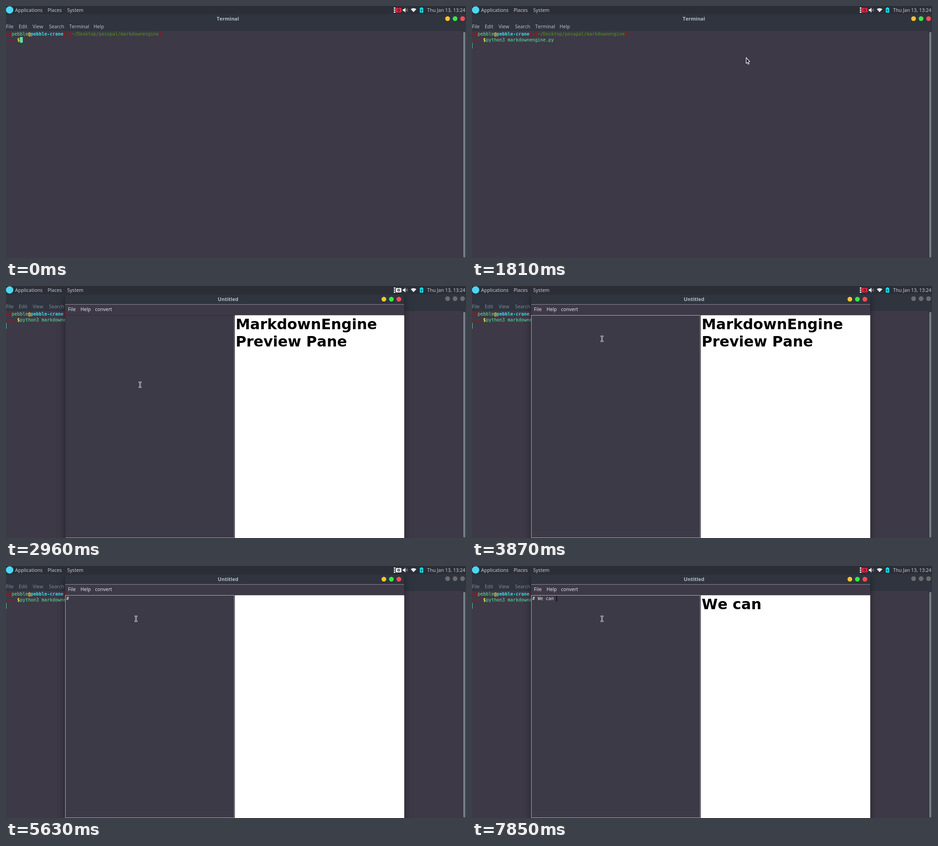
An HTML page with a canvas that plays this animation: 1011x554 px, repeating every 8 s.

```html
<!DOCTYPE html>
<html lang="en">
<head>
<meta charset="utf-8">
<title>Markdown editor demo</title>
<style>
html, body { margin: 0; width: 100%; height: 100%; overflow: hidden; background: #3d3946; }
canvas { display: block; }
</style>
</head>
<body>
<canvas id="stage" width="1011" height="554"></canvas>
<script>
const ctx = document.getElementById('stage').getContext('2d');
const W = 1011, H = 554, LOOP = 8000;
const UI = '10.5px "Noto Sans", sans-serif';
const TITLE = 'bold 11px "Noto Sans", sans-serif';
const MONO = '9.95px "DejaVu Sans Mono", monospace';
const EDIT = '9.84px "DejaVu Sans Mono", monospace';
const HEAD = 'bold 32px "DejaVu Sans", sans-serif';
const BG = '#3d3946', BAR = '#2f343e', INK = '#c3c9d2', GREEN = '#5ee49b', RED = '#c8060c';
const CELL = 5.99, COL0 = -5.5, ROW0 = 55.5, ROW = 12.8;
const BUTTONS = ['#fcc430', '#37e946', '#f84d52'];

// Last value whose start time has passed
const at = (t, steps) => steps.reduce((v, [s, next]) => t >= s ? next : v, null);

const COMMAND = [[0, ''], [390, 'clear'], [900, 'python3 markdownengine.py ']];
const DOC = [[0, ''], [4430, '#'], [5540, '# '], [6200, '# W'], [6330, '# We'], [6440, '# We '],
  [7020, '# We c'], [7320, '# We ca'], [7440, '# We can'], [7530, '# We can ']];
const CARET_FLIPS = [3270, 3870, 4170, 4780, 5040, 5630, 5960, 6510, 6800, 7400, 7700];
const REC_FLIPS = [790, 1620, 2400, 3180, 3960, 4760, 5540, 6300, 7080, 7850];
const PATH = [[1860, 603, 113], [2300, 603, 113], [2470, 435, 115], [2690, 435, 115],
  [2940, 285, 224], [3000, 285, 224], [3220, 286, 116], [8000, 286, 116]];
const SHOW = 1810, OPEN = 1860, CLICK = 3270;
const odd = (t, flips) => flips.filter(s => t >= s).length % 2 === 1;

function rect(x, y, w, h, color) {
  ctx.fillStyle = color;
  ctx.fillRect(x, y, w, h);
}
function box(x, y, w, h, color) {
  ctx.strokeStyle = color;
  ctx.lineWidth = 1;
  ctx.strokeRect(x, y, w, h);
}
function disc(x, y, r, color) {
  ctx.fillStyle = color;
  ctx.beginPath();
  ctx.arc(x, y, r, 0, 7);
  ctx.fill();
}
function poly(color, ...pts) {
  ctx.fillStyle = color;
  ctx.beginPath();
  for (const [x, y] of pts) ctx.lineTo(x, y);
  ctx.closePath();
  ctx.fill();
}
function text(s, x, y, font, color, align = 'left') {
  ctx.font = font;
  ctx.fillStyle = color;
  ctx.textAlign = align;
  ctx.fillText(s, x, y);
}
function term(s, col, row, color, bold) {
  text(s, COL0 + col * CELL, ROW0 + row * ROW + 9.8, (bold ? 'bold ' : '') + MONO, color);
}
function dash(col, row, cells) {
  rect(COL0 + col * CELL, Math.round(ROW0 + row * ROW + 6), cells * CELL, 1, RED);
}
function buttons(x, y, colors) {
  colors.forEach((c, i) => disc(x + i * 16.5, y, 5.2, c));
}

function panel(t) {
  rect(0, 0, W, 18, '#2b2e37');
  disc(8, 8.7, 8, '#4fd6f5');
  text('Applications', 20, 12.7, UI, INK);
  text('Places', 91.5, 12.7, UI, INK);
  text('System', 134.5, 12.7, UI, INK);
  for (const y of [3, 7.5, 12]) rect(852.5, y, 3.2, 3, '#f2f2f2');
  const rec = odd(t, REC_FLIPS) ? '#ffffff' : '#f8243f';
  rect(857, 4.5, 12, 9.5, rec);
  disc(863, 9.2, 2.9, '#2b2e37');
  disc(863, 9.2, 1.2, rec);
  // Speaker
  poly('#e6e8eb', [872, 7], [874.5, 7], [878, 3.5], [878, 14.5], [874.5, 11], [872, 11]);
  ctx.lineWidth = 1;
  for (const [r, c] of [[2.3, '#e6e8eb'], [5, '#8b9098']]) {
    ctx.strokeStyle = c;
    ctx.beginPath();
    ctx.arc(878, 9, r, -0.9, 0.9);
    ctx.stroke();
  }
  // Wi-Fi fan
  ctx.fillStyle = '#e6e8eb';
  ctx.beginPath();
  ctx.moveTo(895.7, 13.5);
  ctx.lineTo(889.5, 7);
  ctx.quadraticCurveTo(895.7, 2.5, 902, 7);
  ctx.fill();
  // Battery
  rect(911.5, 3, 3.5, 2, '#10e6f6');
  rect(909.5, 4.5, 7.5, 10, '#10e6f6');
  poly('#26313b', [914, 5.8], [911, 10], [913, 10], [912.4, 13.2], [915.5, 8.9], [913.5, 8.9]);
  text('Thu Jan 13, 13:24', 1009.5, 12.7, UI, INK, 'right');
}

function terminal(t) {
  const active = t < OPEN;
  rect(0, 18, W, 37, BAR);
  rect(0, 55, W, H - 55, BG);
  text('Terminal', 487.5, 31.5, TITLE, '#b5bdc8', 'center');
  buttons(970.5, 27.7, active ? BUTTONS : Array(3).fill('#6c6c6e'));
  const menu = { File: 0, Edit: 28, View: 58.5, Search: 94.5, Terminal: 139, Help: 192.5 };
  for (const name in menu) text(name, menu[name], 49, UI, active ? '#b9c1cb' : '#7d8a98');
  rect(1003, 55, 8, H - 55, '#37353f');
  ctx.fillStyle = '#74808a';
  ctx.beginPath();
  ctx.roundRect(1005, 57, 4.5, 496, 2);
  ctx.fill();

  dash(0, 0, 2);
  term('[', 2, 0, RED);
  term('pebble', 3, 0, GREEN);
  term('@', 9, 0, '#f7e65a', true);
  term('pebble-crane', 10, 0, '#34dfe8', true);
  term(']', 22, 0, RED);
  dash(23, 0, 1);
  term('[', 24, 0, RED);
  term('~/Desktop/pesapal/markdownengine', 25, 0, '#4e9a0c');
  term(']', 57, 0, RED);
  dash(0, 1, 4);
  rect(COL0 + 3.5 * CELL, ROW0 + ROW + 5.2, CELL / 2, 2, RED);
  term('$', 5, 1, '#f7e65a', true);
  const command = at(t, COMMAND);
  term(command, 6, 1, GREEN);

  const ran = t >= 1440;
  const x = COL0 + (ran ? 0 : 6 + command.length) * CELL;
  const y = ROW0 + (ran ? 2 : 1) * ROW;
  if (active) rect(x, y, CELL + 0.4, ROW - 0.4, GREEN);
  else box(x + 0.5, y + 0.5, CELL - 0.5, ROW - 1, GREEN);
}

function editor(t) {
  const doc = at(t, DOC), focused = t >= CLICK;
  ctx.save();
  ctx.beginPath();
  ctx.rect(0, 18, W, H);
  ctx.clip();
  ctx.shadowColor = 'rgba(15,17,22,.6)';
  ctx.shadowBlur = 14;
  ctx.shadowOffsetY = 3;
  rect(130, 19, 745, H, BAR);
  ctx.restore();

  text('Untitled', 488, 33, TITLE, '#b5bdc8', 'center');
  buttons(830.5, 29, BUTTONS);
  rect(130, 40, 745, 514, BG);
  rect(130, 40, 745, 1, '#8f8c98');
  text('File', 136.3, 54.5, UI, '#e4e3e7');
  text('Help', 163.7, 54.5, UI, '#e4e3e7');
  text('convert', 195.8, 54.5, UI, '#e4e3e7');

  rect(130, 64, 372, 490, '#3c3a47');
  rect(130, 64, 1, 490, '#302d37');
  rect(130, 64, 372, 1, '#302d37');
  rect(131, 553, 371, 1, '#a3a4b0');
  rect(501, 65, 1, 489, '#8f8d99');
  rect(502, 64, 1, 490, '#26242b');
  if (focused) box(130.5, 64.5, 371, 489, '#b0b0bb');
  rect(503, 64.3, 372.3, 490, '#ffffff');

  text(doc, 132.6, 75.3, EDIT, '#e8e6ea');
  if (odd(t, CARET_FLIPS)) rect(132 + doc.length * 5.93, 65.5, 1.5, 12.5, '#000000');

  const lines = doc ? [doc.slice(1).trim()] : ['MarkdownEngine', 'Preview Pane'];
  lines.forEach((s, i) => text(s, 504.7, 95.2 + i * 38, HEAD, '#000000'));
}

function arrow(x, y) {
  ctx.beginPath();
  for (const [dx, dy] of [[0, 0], [0, 12.5], [3, 10.5], [4.5, 14.5], [6.5, 13.5], [5, 9.8], [8, 8.5]])
    ctx.lineTo(x + dx, y + dy);
  ctx.closePath();
  ctx.fillStyle = '#2c2a31';
  ctx.fill();
  ctx.strokeStyle = '#ffffff';
  ctx.lineWidth = 1.1;
  ctx.stroke();
}
function beam(x, y) {
  for (const [w, color] of [[2.6, '#f4f4f4'], [0.9, '#2b2930']]) {
    ctx.strokeStyle = color;
    ctx.lineWidth = w;
    ctx.lineCap = 'square';
    ctx.beginPath();
    for (const dy of [-5.5, 5.5]) {
      ctx.moveTo(x - 1.7, y + dy);
      ctx.lineTo(x + 1.7, y + dy);
    }
    ctx.moveTo(x, y - 5.5);
    ctx.lineTo(x, y + 5.5);
    ctx.stroke();
  }
  ctx.lineCap = 'butt';
}
function pointer(t) {
  if (t < SHOW) return;
  if (t < OPEN) return arrow(602.5, 113.5);
  const s = Math.max(OPEN, Math.floor(t / 43) * 43);
  const i = PATH.findIndex(p => p[0] > s);
  const [t0, x0, y0] = PATH[i - 1], [t1, x1, y1] = PATH[i];
  const k = (s - t0) / (t1 - t0);
  beam(Math.round(x0 + (x1 - x0) * k) - 0.3, Math.round(y0 + (y1 - y0) * k));
}

function draw(now) {
  const t = now % LOOP;
  terminal(t);
  panel(t);
  if (t >= OPEN) editor(t);
  pointer(t);
}

ctx.fontKerning = 'none';
const start = performance.now();
function tick() {
  draw(performance.now() - start);
  requestAnimationFrame(tick);
}
tick();
</script>
</body>
</html>
```
